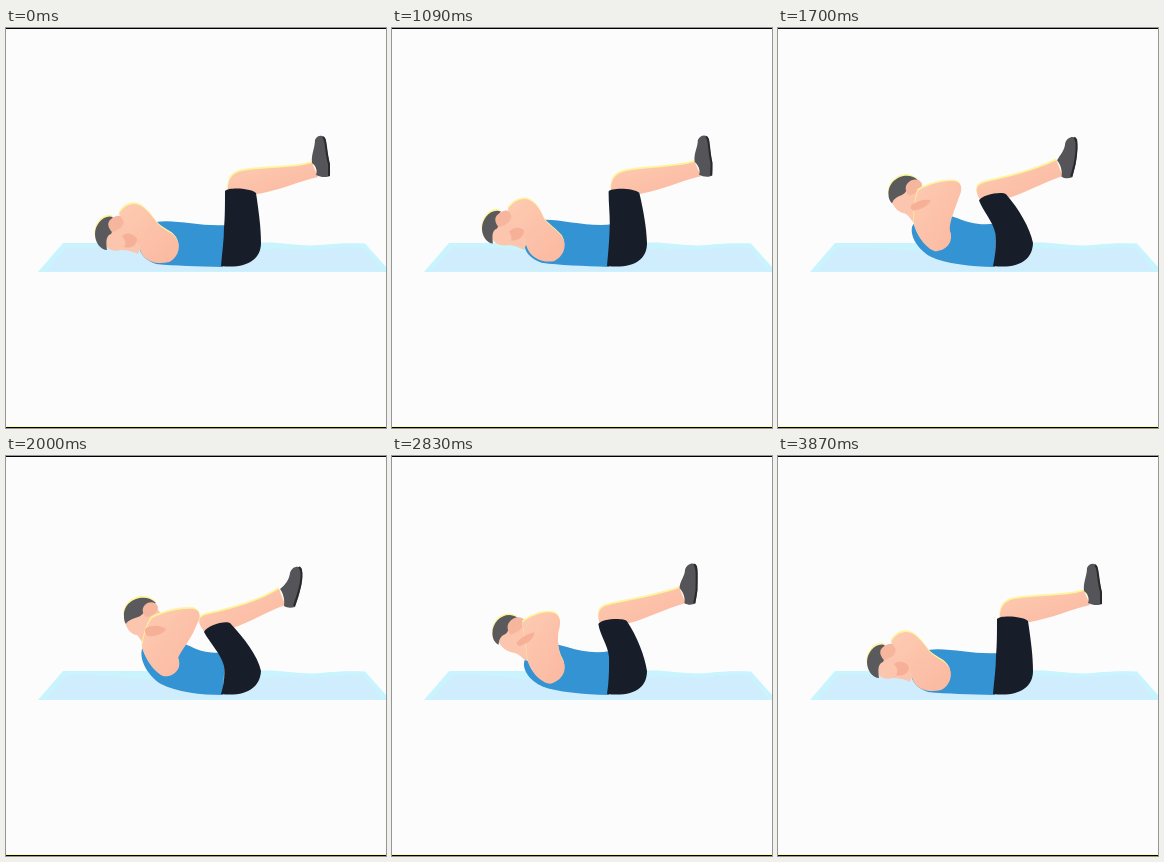
Write an HTML page that moves like this. It is 380 by 400 pixels and loops after 4.14 s.

```html
<!DOCTYPE html>
<html lang="en">
<head>
<meta charset="utf-8">
<title>Curl exercise</title>
<style>
html, body { margin: 0; width: 100%; height: 100%; overflow: hidden; background: #fcfcfd; }
svg { display: block; width: 380px; height: 400px; }
</style>
</head>
<body>
<svg viewBox="0 0 380 400">
  <defs>
    <linearGradient id="skin" x1="0" y1="0" x2="1" y2="1">
      <stop offset="0" stop-color="#fdcbb2"/>
      <stop offset="1" stop-color="#fbb8a0"/>
    </linearGradient>
  </defs>
  <rect width="380" height="400" fill="#fcfcfd"/>
  <path fill="#c9f4fe" d="M57 215 H250 C275 213 292 219 315 217 C332 215 345 215 359 215.500 L380 239 V244 H32 Z"/>
  <path fill="#d0edfd" d="M61 219 C85 219 110 219 126 223 L250 221 C285 219 300 223 318 221 C335 219 348 219 358 220 L376 243 H40 Z"/>
  <g id="body"></g>
  <path fill="#ffffa0" d="M0 398H380V399H0Z"/>
  <path fill="#000" d="M0 0H380V1H0ZM0 399H380V400H0Z"/>
</svg>
<script>
const LOOP = 4140, MID = 0.5;
const NS = 'http://www.w3.org/2000/svg';
const body = document.getElementById('body');

// Each part: its outline lying flat, half way up and fully curled.
const face = [
  'M101 196 C110 186 120 186 126 190 L138 208 L132 226 C128 224 122 222 115 222 C108 224 103 222 100 218 C97 210 98 202 101 196Z',
  'M112 172 C122 165 132 168 138 172 L140 200 L135 208 C130 206 126 200 120 200 C112 199 107 194 104 188 C103 181 108 176 112 172Z',
  'M136 152 C146 146 152 152 156 160 L158 185 L142 192 C138 192 136 184 131 179 C126 179 121 174 119 166 C123 160 130 156 136 152Z'];
const hair = [
  'M107 189 C98 186 89 196 89 206 C89 215 95 222 101 222 C100 214 100 210 103 207 C110 205 102 196 107 189Z',
  'M122 165 C111 158 98 168 98 181 C98 187 101 191 105 193 C105 188 106 184 110 182 C116 180 112 170 122 165Z',
  'M150 147 C140 136 117 143 118 160 C118 163 118 165 120 168 C121 165 126 163 132 161 C140 158 137 152 150 147Z'];
const ear = [
  'M104 192 C110 186 117 187 118 191 C118 198 114 202 106 204 C102 200 101 195 104 192Z',
  'M114 170 C119 163 128 163 130 168 C130 174 124 179 116 182 C112 178 112 173 114 170Z',
  'M138 150 C143 144 150 146 152 151 C152 156 147 160 140 161 C136 157 136 153 138 150Z'];
const shade = [
  'M116 208 C122 203 128 206 131 211 C131 218 124 221 118 219 C121 214 119 212 116 208Z',
  'M124 188 C130 182 136 180 140 179 C140 186 134 190 126 193 C123 192 122 190 124 188Z',
  'M140 172 C146 169 154 169 160 173 C158 178 148 181 142 180 C139 178 138 175 140 172Z'];
const arm = [
  'M113 186 C118 177 126 174 133 177 C140 180 146 188 151 195 C157 202 166 204 170 210 C176 218 172 230 163 234 C152 237 139 234 135 224 C133 214 122 200 113 186Z',
  'M128 168 C138 160 150 156 158 159 C165 162 165 170 163 178 C163 186 165 196 171 205 C176 216 169 226 158 229 C146 227 136 214 135 203 C134 194 130 180 128 168Z',
  'M146 162 C160 155 178 152 188 153 C195 155 195 161 191 168 C186 182 176 193 172 202 C177 213 167 222 157 220 C146 215 137 198 136 190 C138 180 140 170 146 162Z'];
const torso = [
  'M150 194 C170 191 195 199 221 197 L217 239 C190 238 170 238 150 236 C138 232 132 224 133 214 C134 205 140 197 150 194Z',
  'M150 186 C168 188 192 200 218 195 L217 239 C190 238 165 236 150 231 C138 226 130 216 132 207 C135 198 140 190 150 186Z',
  'M160 184 C184 184 188 200 219 196 L217 239 C195 239 170 236 155 228 C142 220 133 204 136 193 C142 186 150 183 160 184Z'];
const leg = [
  'M222 164 C221 152 226 145 236 143 C258 139 285 141 306 135 L312 149 C290 154 275 162 252 166Z',
  'M209 165 C207 154 211 149 222 147 C244 142 268 139 290 132 L296 147 C275 153 258 162 238 167Z',
  'M199 176 C190 166 192 160 203 158 C226 153 252 146 273 133 L279 149 C260 156 245 166 224 173Z'];
const shorts = [
  'M219 163 C222 159 245 160 250 165 C253 185 255 200 255 215 C255 232 240 241 215 238 C216 225 218 212 218 200 C219 190 219 176 219 163Z',
  'M208 167 C210 162 233 161 237 165 C246 180 253 200 255 215 C255 232 242 241 215 238 C217 225 217 210 217 200 C216 188 209 178 208 167Z',
  'M198 176 C200 170 219 164 224 167 C238 182 252 200 255 215 C254 232 240 241 215 238 C218 228 219 220 218 210 C215 198 204 187 198 176Z'];
const shoe = [
  'M309 112 C311 107 318 106 320 112 C320 122 325 135 324 148 C320 150 314 149 310 147 C312 142 309 137 306 135 C305 126 309 120 309 112Z',
  'M295 113 C297 107 304 105 307 110 C307 121 309 133 306 147 C303 149 299 149 295 147 C296 142 294 136 290 132 C290 124 295 120 295 113Z',
  'M284 117 C286 110 293 109 296 113 C297 124 294 138 289 151 C285 152 281 152 278 150 C279 143 277 137 274 133 C280 128 283 124 284 117Z'];
const sole = [
  'M317 109 C321 112 319 122 323 136 L323 148',
  'M304 108 C308 111 306 121 307 134 L305 147',
  'M293 111 C297 114 296 126 292 138 L288 150'];

const parts = [];
function add(poses, attrs) {
  const el = document.createElementNS(NS, 'path');
  for (const k in attrs) el.setAttribute(k, attrs[k]);
  body.append(el);
  const nums = poses.map(d => d.match(/[\d.]+/g).map(Number));
  parts.push({ el, nums, d: poses[0] });
}
const fill = (poses, color) => add(poses, { fill: color });
const glow = poses => add(poses, { fill: '#fdf59a', transform: 'translate(-.5 -1.7)' });

glow(leg);
fill(leg, 'url(#skin)');
fill(shoe, '#555459');
add(sole, { fill: 'none', stroke: '#29282c', 'stroke-width': 2 });
fill(torso, '#3493d2');
fill(shorts, '#171e29');
glow(hair);
fill(face, '#fcc5ae');
fill(hair, '#5a595c');
fill(ear, '#f6b59d');
glow(arm);
fill(arm, 'url(#skin)');
fill(shade, '#f6b098');

const ease = (t, a, b) => {
  const u = Math.min(1, Math.max(0, (t - a) / (b - a)));
  return (1 - Math.cos(Math.PI * u)) / 2;
};

function draw(t) {
  const p = ease(t, 850, 2000) - ease(t, 2170, 3640);
  // Quadratic blend through the three poses.
  const flat = (p - MID) * (p - 1) / MID;
  const half = p * (p - 1) / (MID * (MID - 1));
  const full = p * (p - MID) / (1 - MID);
  for (const { el, nums: [a, b, c], d } of parts) {
    let i = 0;
    el.setAttribute('d', d.replace(/[\d.]+/g, () => {
      const v = a[i] * flat + b[i] * half + c[i] * full;
      i++;
      return v.toFixed(2);
    }));
  }
}

const start = performance.now();
function tick() {
  draw((performance.now() - start) % LOOP);
  requestAnimationFrame(tick);
}
tick();
</script>
</body>
</html>
```
